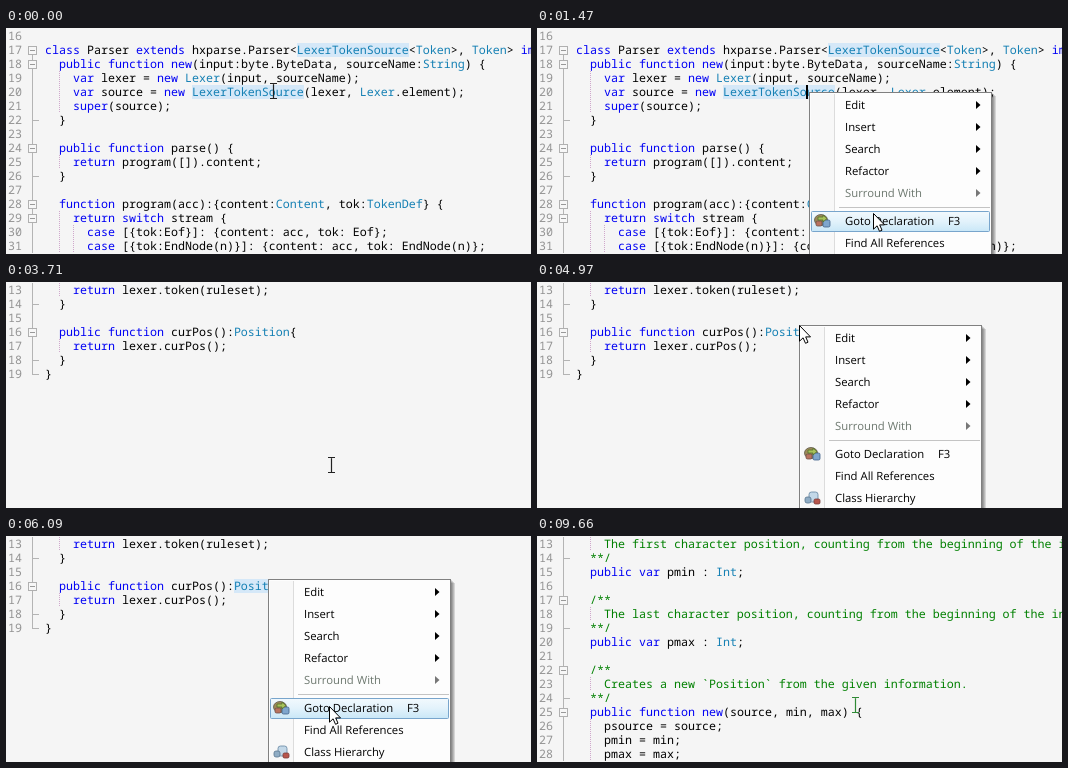
Animation, 525 px wide and 226 px high, one loop 9.8 s. Source, as an HTML page:

```html
<!DOCTYPE html>
<html lang="en">
<head>
<meta charset="utf-8">
<title>Goto declaration</title>
<style>
html, body { margin: 0; width: 100%; height: 100%; overflow: hidden; background: #f5f5f5; }
svg { display: block; width: 525px; height: 226px; }
text { white-space: pre; text-rendering: geometricPrecision; }
.code { font: 11.6667px "Noto Sans Mono", "DejaVu Sans Mono", monospace; }
.menu { font: 11.3px "Open Sans", "Noto Sans", sans-serif; }
</style>
</head>
<body>
<svg id="stage" viewBox="0 0 525 226">
  <defs>
    <linearGradient id="hover" x1="0" y1="0" x2="0" y2="1">
      <stop offset="0" stop-color="#f2f9fd"/>
      <stop offset=".5" stop-color="#e2f2fb"/>
      <stop offset="1" stop-color="#c9e7f7"/>
    </linearGradient>
  </defs>
</svg>
<script>
const LOOP = 9800, STEP = 70, CHAR = 7, ROW = 14, LEFT = 39;
const stage = document.getElementById('stage');

function add(parent, tag, attrs = {}, content) {
  const node = document.createElementNS('http://www.w3.org/2000/svg', tag);
  for (const key in attrs) node.setAttribute(key, attrs[key]);
  if (content !== undefined) node.textContent = content;
  parent.appendChild(node);
  return node;
}
const rect = (parent, x, y, width, height, fill, more) =>
  add(parent, 'rect', { x, y, width, height, fill, ...more });
const show = (node, on) => node.setAttribute('visibility', on ? 'visible' : 'hidden');
const place = (node, x, y) => node.setAttribute('transform', `translate(${x} ${y})`);

// Syntax colouring
const KEYWORDS = /^(class|extends|implements|public|function|var|new|return|switch|case|super)$/;
const TYPES = /^(LexerTokenSource|Token|Lexer|String|Content|TokenDef|Position|Int)$/;
function colour(word) {
  return KEYWORDS.test(word) ? '#0000f4' : TYPES.test(word) ? '#1580b4' : '#000';
}

function codeLine(parent, line, y) {
  const text = add(parent, 'text', { x: LEFT, y });
  const trimmed = line.trim();
  const isComment = /^(\/\*\*|\*\*\/|The |Creates )/.test(trimmed);
  const parts = isComment ? [line] : line.match(/\w+|\W+/g) || [];
  for (const part of parts)
    add(text, 'tspan', { fill: isComment ? '#008000' : colour(part) }, part);
}

// folds: + opens a block, - closes an inner one, L closes the last, | passes through
function makeDoc(first, folds, lines, marks = []) {
  const doc = add(stage, 'g', { class: 'code' });
  const markNodes = marks.map(([row, col, len]) =>
    rect(doc, LEFT + col * CHAR, 1 + row * ROW, len * CHAR, ROW, '#d5e8f8'));
  lines.forEach((line, i) => {
    const top = 1 + i * ROW, mid = top + 7, fold = folds[i];
    add(doc, 'text', { x: 2, y: top + 11, fill: '#939393' }, first + i);
    if (fold !== ' ') {
      const start = folds[i - 1] === ' ' ? mid : top;
      rect(doc, 26, start, 1, (fold === 'L' ? mid + 1 : top + ROW) - start, '#b4b4b4');
      if (fold === '-' || fold === 'L') rect(doc, 27, mid, 6, 1, '#b4b4b4');
      if (fold === '+') {
        rect(doc, 22.5, mid - 3.5, 8, 8, '#f7f7f7', { stroke: '#b0b0b0' });
        rect(doc, 24, mid, 5, 1, '#999');
      }
    }
    const indent = line.search(/\S/);
    for (let col = 2; col < indent; col += 2)
      add(doc, 'path', {
        d: `M${LEFT + col * CHAR + .5} ${top}v${ROW}`,
        stroke: '#d0a8cc', 'stroke-dasharray': '1 1'
      });
    codeLine(doc, line, top + 11);
  });
  return { doc, markNodes };
}

const parser = makeDoc(16, ' ++|||-|+|-|++||', [
  '',
  'class Parser extends hxparse.Parser<LexerTokenSource<Token>, Token> implements',
  '  public function new(input:byte.ByteData, sourceName:String) {',
  '    var lexer = new Lexer(input, sourceName);',
  '    var source = new LexerTokenSource(lexer, Lexer.element);',
  '    super(source);',
  '  }',
  '',
  '  public function parse() {',
  '    return program([]).content;',
  '  }',
  '',
  '  function program(acc):{content:Content, tok:TokenDef} {',
  '    return switch stream {',
  '      case [{tok:Eof}]: {content: acc, tok: Eof};',
  '      case [{tok:EndNode(n)}]: {content: acc, tok: EndNode(n)};'
], [[1, 36, 16], [4, 21, 16]]);

const tokens = makeDoc(13, '|-|+|-L', [
  '    return lexer.token(ruleset);',
  '  }',
  '',
  '  public function curPos():Position{',
  '    return lexer.curPos();',
  '  }',
  '}'
], [[3, 27, 8]]);

const position = makeDoc(13, '|-||+|-||+|-+|||', [
  '    The first character position, counting from the beginning of the input.',
  '  **/',
  '  public var pmin : Int;',
  '',
  '  /**',
  '    The last character position, counting from the beginning of the input.',
  '  **/',
  '  public var pmax : Int;',
  '',
  '  /**',
  '    Creates a new `Position` from the given information.',
  '  **/',
  '  public function new(source, min, max) {',
  '    psource = source;',
  '    pmin = min;',
  '    pmax = max;'
]);

const caret = rect(stage, 0, 0, 2, ROW, '#000');

// Context menu
const ITEMS = [
  ['Edit', 13], ['Insert', 35], ['Search', 57], ['Refactor', 79], ['Surround With', 101],
  ['Goto Declaration', 129], ['Find All References', 151], ['Class Hierarchy', 173]
];
const menu = add(stage, 'g', { class: 'menu' });
for (let i = 1; i <= 4; i++) rect(menu, i, i, 183, 240, '#000', { opacity: .13 });
rect(menu, .5, .5, 182, 240, '#fdfdfd', { stroke: '#808080' });
rect(menu, 2, 2, 24, 240, '#f8f8f8');
rect(menu, 25, 2, 1, 240, '#dcdcdc');
rect(menu, 30, 115, 151, 1, '#c4c4c4');
const hover = rect(menu, 2.5, 0, 178, 20, 'url(#hover)', { stroke: '#78a5cc', rx: 1 });
ITEMS.forEach(([label, mid], i) => {
  const disabled = i === 4;
  add(menu, 'text', { x: 36, y: mid + 4, fill: disabled ? '#6d786f' : '#000' }, label);
  if (i < 5) add(menu, 'path', { d: `M167 ${mid - 4}l4.5 4-4.5 4z`, fill: disabled ? '#777' : '#000' });
});
add(menu, 'text', { x: 139, y: 133, fill: '#000' }, 'F3');

function icon(y) {
  return add(menu, 'g', { transform: `translate(13 ${y})`, 'stroke-width': .8 });
}
const gotoIcon = icon(129);
add(gotoIcon, 'ellipse', { cx: -1, cy: -1, rx: 6.5, ry: 5.5, fill: '#9c8a58', stroke: '#5d5748' });
rect(gotoIcon, -6, 0, 6, 5, '#b9735f', { rx: 1.5, stroke: '#6e5048' });
rect(gotoIcon, 1, -1, 7, 7, '#7fa6cd', { rx: 1.5, stroke: '#40608a' });
add(gotoIcon, 'path', { d: 'M-4-4h5v-2l4 3.5-4 3.5v-2h-5z', fill: '#a8c25a', stroke: '#55702c' });
const classIcon = icon(173);
rect(classIcon, -3, -6, 9, 10, '#c3d8e8', { rx: 2.5, stroke: '#6484a0' });
rect(classIcon, -7, -1, 6, 6, '#8facc4', { rx: 2, stroke: '#587690' });
rect(classIcon, 2, 1, 6, 5, '#b8564c', { rx: 1.5, stroke: '#783a38' });

// Pointers, both anchored at the hot spot
const arrow = add(stage, 'path', {
  d: 'M.5.5V16.2L4.1 12.8 6.5 18.3 9 17.2 6.7 11.9H11.5Z',
  fill: '#fff', stroke: '#000', 'stroke-linejoin': 'round'
});
const beam = add(stage, 'path', {
  d: 'M-8-8.5h3l.5.5.5-.5h3M-4.5-8.5v15M-8 6.5h3l.5-.5.5.5h3',
  fill: 'none', 'stroke-width': 1.2
});

const PATH = [
  [0, 272, 64], [910, 272, 64], [1470, 336, 185], [1540, 336, 188],
  [1610, 336, 188], [1680, 336, 189], [3640, 336, 189], [3710, 330, 184],
  [4340, 262, 43], [5320, 262, 43], [6090, 323, 170], [LOOP, 323, 170]
];
function pointerAt(t) {
  const i = PATH.findIndex(key => key[0] > t);
  const [t0, x0, y0] = PATH[i - 1], [t1, x1, y1] = PATH[i];
  const p = (t - t0) / (t1 - t0), e = p * p * (3 - 2 * p);
  return [Math.round(x0 + (x1 - x0) * e), Math.round(y0 + (y1 - y0) * e)];
}
const within = (t, from, to) => t >= from && t < to;

function render(time) {
  const t = Math.floor((time % LOOP) / STEP) * STEP;
  const [x, y] = pointerAt(t);

  show(parser.doc, t < 2450);
  show(tokens.doc, within(t, 2450, 7000));
  show(position.doc, t >= 7000);
  tokens.markNodes[0].setAttribute('fill-opacity', t >= 5460 ? 1 : 0);

  const inLast = t >= 7210;
  caret.setAttribute('x', inLast ? 39 : 269);
  caret.setAttribute('y', inLast ? 169 : 57);
  show(caret, within(t, 420, 980) || within(t, 1470, 1960) ||
    inLast && Math.floor((t - 7210) / 490) % 2 === 0);

  const firstMenu = within(t, 420, 2380), menuOn = firstMenu || within(t, 4970, 7000);
  const [menuX, menuY] = firstMenu ? [272, 64] : [262, 43];
  menu.setAttribute('display', menuOn ? 'inline' : 'none');
  place(menu, menuX, menuY);
  const item = ITEMS.find(([, mid]) => Math.abs(y - menuY - mid) <= 10);
  show(hover, item && x > menuX + 2);
  if (item) hover.setAttribute('y', item[1] - 9.5);

  const isArrow = within(t, 490, 2520) || within(t, 4970, 7070);
  show(arrow, isArrow);
  show(beam, !isArrow);
  place(arrow, x, y);
  place(beam, x, y);
  beam.setAttribute('stroke', t >= 7070 ? '#2f8a35' : '#222');
}

const began = performance.now();
function tick() {
  render(performance.now() - began);
  requestAnimationFrame(tick);
}
tick();
</script>
</body>
</html>
```
